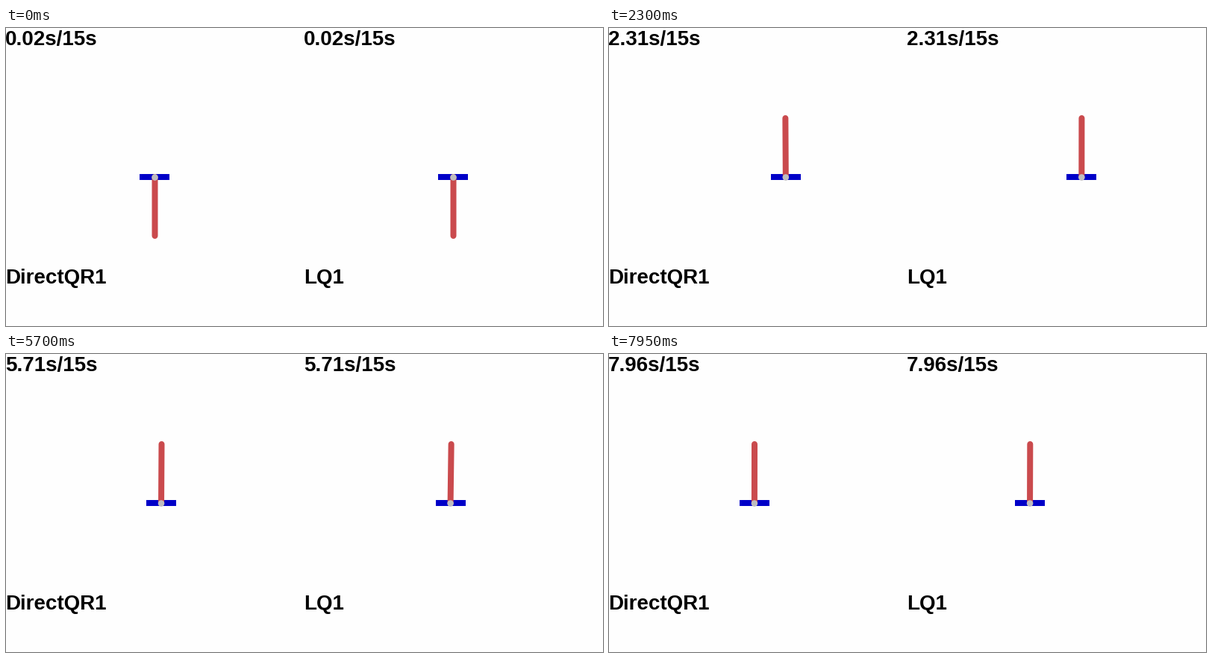
Write a matplotlib script that moves like this. It is 800 by 400 pixels and loops after 8 s.

```python
import math
import matplotlib.pyplot as plt
from matplotlib.animation import FuncAnimation
from matplotlib.patches import Circle, Rectangle

W, H, DPI = 800, 400, 100
FRAMES, STEP_MS = 160, 50
PX = 72 / DPI
POLE_LEN, TRACK_Y = 79, 200
GRAVITY = 9.81 * 80       # px/s^2
DRIFT_WIDTH = 1.3         # seconds


def ease(t, start, end):
    u = min(max((t - start) / (end - start), 0), 1)
    return (1 - math.cos(math.pi * u)) / 2


def swing_up(t):
    """Cart x and pole angle (degrees clockwise from upright): back, then up."""
    x = 199.5 - 54.5 * ease(t, 0, 0.8) + 125 * ease(t, 0.8, 1.51)
    angle = -180 - 40 * ease(t, 0, 0.6) + 220 * ease(t, 0.6, 1.44)
    return x, angle


def balance(t, rest, height, peak):
    """Cart drifts out and settles; the pole leans with its acceleration."""
    s = 1 / math.cosh((t - peak) / DRIFT_WIDTH)
    x = rest + height * s
    accel = height * s * (1 - 2 * s * s) / DRIFT_WIDTH ** 2
    return x, math.degrees(0.6 * accel / GRAVITY)


class Panel:
    def __init__(self, ax, left, name, rest, height, peak):
        self.left = left
        self.drift = rest, height, peak
        self.cart = ax.add_patch(Rectangle((0, TRACK_Y - 4), 40, 8, fc="#0000c8", lw=0))
        self.pole, = ax.plot([], [], color="#ca4a4d", lw=8 * PX,
                             solid_capstyle="round", snap=False)
        self.axle = ax.add_patch(Circle((0, 0), 4.3, fc="#bfbdbf", lw=0, zorder=3))
        font = dict(family="Liberation Sans", weight="bold", size=27.8 * PX,
                    color="black", va="baseline")
        self.clock = ax.text(left - 0.8, 22.8, "", **font)
        ax.text(left - 0.8, 342.8, name, **font)

    def pose(self, t):
        x, angle = swing_up(t)
        x_end, lean = balance(t, *self.drift)
        mix = ease(t, 1.51, 2.1)
        return self.left + x + (x_end - x) * mix, math.radians(angle + lean * mix)

    def update(self, t, clock):
        x, a = self.pose(t)
        self.cart.set_x(round(x - 20.1))
        self.axle.center = (x, TRACK_Y + 0.5)
        self.pole.set_data([x, x + POLE_LEN * math.sin(a)],
                           [TRACK_Y, TRACK_Y - POLE_LEN * math.cos(a)])
        self.clock.set_text(clock)


fig = plt.figure(figsize=(W / DPI, H / DPI), dpi=DPI, facecolor="#fefefe")
ax = fig.add_axes([0, 0, 1, 1])
ax.set_xlim(0, W)
ax.set_ylim(H, 0)
ax.axis("off")
panels = [
    Panel(ax, 0, "DirectQR1", rest=192, height=56, peak=3.2),
    Panel(ax, 400, "LQ1", rest=157, height=110, peak=3.48),
]


def draw(k):
    clock = f"{(3 * k + 1) * 0.01665:.2f}s/15s"
    for panel in panels:
        panel.update(k * STEP_MS / 1000, clock)


anim = FuncAnimation(fig, draw, frames=FRAMES, interval=STEP_MS, repeat=True, repeat_delay=0)
plt.show()
```
